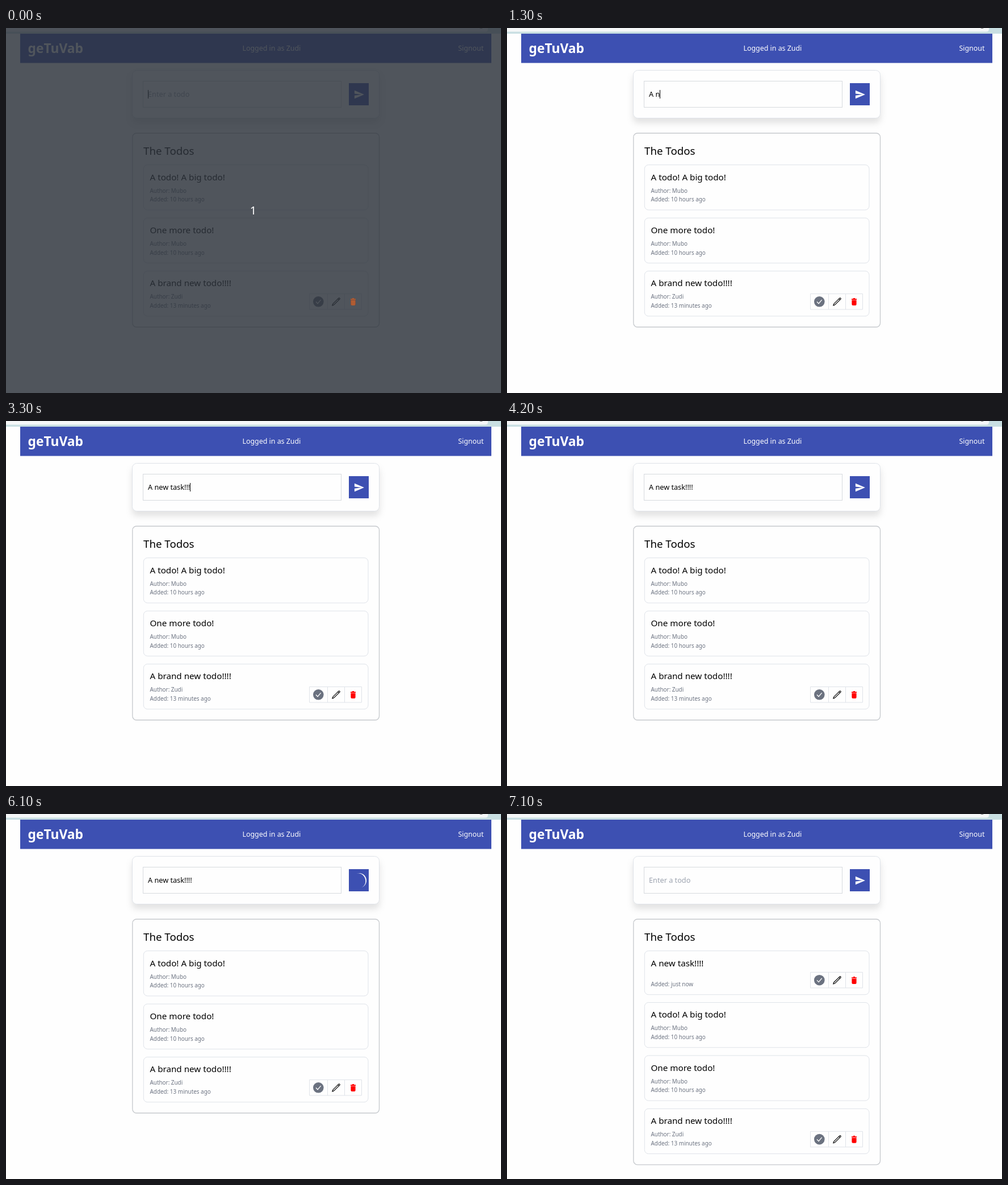
Write an HTML page that moves like this. It is 872 by 642 pixels and loops after 8000 ms.

```html
<!DOCTYPE html>
<html lang="en">
<head>
<meta charset="utf-8">
<title>Todo list</title>
<style>
  html, body { margin: 0; width: 100%; height: 100%; overflow: hidden; background: #fefefe; }
  svg { display: block; width: 872px; height: 642px; font-family: "Noto Sans", "Open Sans", sans-serif; }
  text { white-space: pre; }
  .box { fill: #fefefe; stroke: #dfe3e9; }
  .title { font-size: 15.2px; }
  .meta { font-size: 9.9px; fill: #6b7280; }
  .nav { font-size: 12.4px; fill: #fff; }
  .field { font-size: 12.7px; }
  .card { filter: drop-shadow(0 8px 6px rgba(0, 0, 0, .11)); }
</style>
</head>
<body>
<svg viewBox="0 0 872 642">
  <defs>
    <path id="trash" d="M607 476.3h2.6l.8-1.3h2.2l.8 1.3h2.6v1.6h-9zM607.4 478.6h8.2v7.4q0 2-2 2h-4.2q-2 0-2-2z"/>
    <g id="tools">
      <path class="box" d="M534.5 467.5h92v27.5h-92zM566.5 467.5v27.5M596.5 467.5v27.5"/>
      <circle cx="550.3" cy="481.3" r="9.3" fill="#6b7280"/>
      <path d="M546 481.5l3 3.2 5.6-6.6" fill="none" stroke="#fff" stroke-width="1.3"/>
      <path transform="translate(573.4 473.4) scale(.67)" fill="none" stroke="#000" stroke-width="1.7"
        d="M16.9 4.5l1.7-1.7a1.9 1.9 0 1 1 2.6 2.7L6.8 19.8a4.5 4.5 0 0 1-1.9 1.1l-2.7.8.8-2.7a4.5 4.5 0 0 1 1.1-1.9zL19.5 7.1"/>
      <use href="#trash" fill="#f00"/>
    </g>
  </defs>

  <rect width="872" height="10" fill="#c9dfe2"/>
  <path d="M0 0H849V2Q849 6.500 844 6.500H0z" fill="#f5f7f8"/>
  <path d="M834 0h6q-3 2-6 0" fill="#666"/>

  <rect x="25" y="10" width="830" height="51.500" fill="#3d50b2"/>
  <text x="38.500" y="44" font-size="22.800" font-weight="700" fill="#fff">geTuVab</text>
  <text class="nav" x="416.500" y="40">Logged in as Zudi</text>
  <text class="nav" x="796.500" y="40">Signout</text>

  <rect class="box card" x="222.500" y="74.500" width="435" height="84" rx="8"/>
  <rect class="box" x="241.500" y="93.500" width="349" height="46" style="stroke:#d6dade"/>
  <text class="field" id="field" x="250" y="121"></text>
  <rect id="caret" y="109" width="1" height="15"/>
  <rect x="604" y="97" width="35" height="39" fill="#3d50b2"/>
  <path id="send" transform="translate(612.300 107.300) scale(.81)" fill="#fff" d="M2 21L23 12 2 3v7l15 2-15 2z"/>
  <path id="spin" fill="#fff" d="M-13 0A13 13 0 0 1 13 0A13 11.100 0 0 0 -13 0"/>

  <rect id="panel" x="222.800" y="185" width="434.700" rx="7" fill="#fefefe" stroke="#c6c9cd" stroke-width="1.300"/>
  <text x="242" y="222.500" font-size="18.700">The Todos</text>
  <g id="fresh"></g>
  <g id="list"></g>

  <g id="cover">
    <rect width="872" height="642" fill="#2d333c" opacity=".83"/>
    <use href="#trash" fill="#b05c32"/>
    <text x="435.500" y="328" font-size="20" fill="#fff" text-anchor="middle">1</text>
  </g>
</svg>
<script>
const $ = id => document.getElementById(id);
const show = (id, on) => $(id).setAttribute('visibility', on ? 'visible' : 'hidden');

const TASK = 'A new task!!!!';
const KEYS = [700, 1000, 1300, 1400, 1500, 1700, 1800, 2000, 2100, 2300, 2700, 3000, 3300, 3600];
const CLICK = 6000, ADDED = 6900, DONE = 7100, LOOP = 8000;
const TOP = 240.7, PITCH = 93.4, SHIFT = 90.8;

function item(y, height, title, author, added, addedY, toolsY) {
  return `<rect class="box" x="242.300" y="${y}" width="395.700" height="${height}" rx="7"/>
    <text class="title" x="253.500" y="${y + 26.8}">${title}</text>
    ${author && `<text class="meta" x="253.500" y="${y + 48.8}">Author: ${author}</text>`}
    <text class="meta" x="253.500" y="${y + addedY}">Added: ${added}</text>
    ${toolsY ? `<use href="#tools" y="${y + toolsY - 467.5}"/>` : ''}`;
}

$('list').innerHTML = [
  ['A todo! A big todo!', 'Mubo', '10 hours ago', 64.4, 0],
  ['One more todo!', 'Mubo', '10 hours ago', 64.4, 0],
  ['A brand new todo!!!!', 'Zudi', '13 minutes ago', 64.4, 40]
].map((row, i) => item(TOP + i * PITCH, 79.3, ...row)).join('');
$('fresh').innerHTML = item(TOP, 77, TASK, '', 'just now', 62, 37.7);

function draw(now) {
  const t = Math.floor(now % LOOP / 100) * 100;
  const typed = t < DONE ? TASK.slice(0, KEYS.filter(k => k <= t).length) : '';
  const added = t >= ADDED, busy = t >= CLICK && t < DONE;

  const field = $('field');
  field.textContent = typed || 'Enter a todo';
  field.setAttribute('fill', typed ? '#000' : '#9ca3af');
  $('caret').setAttribute('x', 250 + (typed && Math.round(field.getComputedTextLength())));
  show('caret', t < 4200 || t >= 4800 && t < 5400);

  show('send', !busy);
  show('spin', busy);
  $('spin').setAttribute('transform', `translate(622 117) rotate(${(t - 5903) * .36})`);

  show('fresh', added);
  $('list').setAttribute('transform', `translate(0 ${added ? SHIFT : 0})`);
  $('panel').setAttribute('height', added ? 341 + SHIFT : 341);
  show('cover', t < 100);
  requestAnimationFrame(() => draw(performance.now() - start));
}
const start = performance.now();
draw(0);
</script>
</body>
</html>
```
